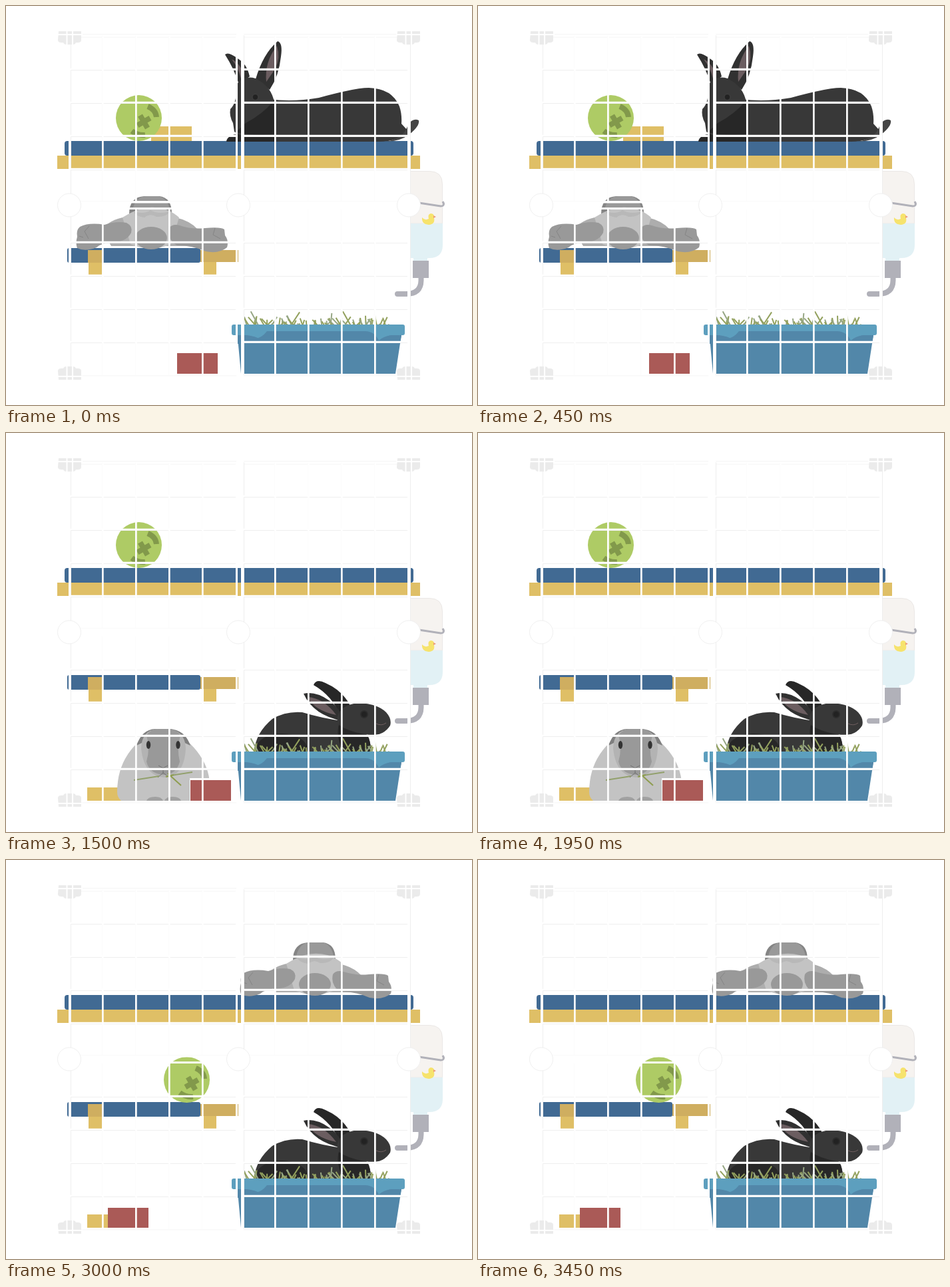
An HTML page that plays this animation: 700 px wide and 600 px high, repeating every 3750 ms.

```html
<!DOCTYPE html>
<html lang="en">
<head>
<meta charset="utf-8">
<title>Rabbit pen</title>
<style>
html, body { margin: 0; width: 100%; height: 100%; overflow: hidden; background: #fff; }
svg { display: block; width: 700px; height: 600px; }
.coat { fill: #383838; }
.dark { fill: #272727; }
.ear { fill: #313131; }
.pink { fill: #6b5d60; }
.wood { fill: #dfbf66; }
.shade { fill: #cfae60; }
.blue { fill: #416a93; }
.pale { fill: #c3c3c3; }
.mid { fill: #adadad; }
.grey { fill: #999; }
.line { fill: none; stroke: #858585; }
.mark { fill: none; stroke: #82994b; stroke-width: 8; }
</style>
</head>
<body>
<svg viewBox="0 0 700 600">
  <defs>
    <g id="joint">
      <path fill="#ebebeb" d="M79-9H113V4Q113 8 108 8H105Q104 11 100 11H91Q87 11 86 8H83Q78 8 78 4Z"/>
      <path stroke="#fff" stroke-width="2" d="M77-4H115M91.5-10V12M100-10V12"/>
    </g>
  </defs>

  <g id="bottle">
    <path fill="#f6f3f0" stroke="#ebe8e6" d="M607 248.500H636Q655.500 248.500 655.500 268V327H607Z"/>
    <path fill="#e2f1f5" d="M607 327H656V359Q656 379 636 379H633V383H612V379H607Z"/>
    <path fill="#b1b1b9" d="M611 383H635V409H611Z"/>
    <path fill="none" stroke="#b1b1b9" stroke-width="8" stroke-linecap="round" d="M623.500 408V413Q623 433 601 433H588"/>
    <path fill="none" stroke="#b1b1b9" stroke-width="3" d="M607 294L653 301Q658 301 657.500 297L656 294"/>
    <path fill="#f6e36d" d="M625 318Q629 323 635 320Q633 313 638 312Q644 312 643 319Q645 328 635 329Q624 328 625 318Z"/>
    <path fill="#ed9c78" d="M642 315L646 317L642 319Z"/>
  </g>

  <rect class="blue" x="88" y="203" width="524" height="22" rx="4"/>
  <path class="wood" d="M77 225H622V245H77ZM124 385H144V404H124ZM297 385H316V404H297Z"/>
  <rect class="blue" x="92" y="364" width="200" height="22" rx="3"/>
  <path class="shade" d="M123 367H144V386H123ZM292 367H349V385H292Z"/>

  <rect id="plank" class="wood" width="61" height="22"/>

  <g id="ball">
    <circle cx="199.500" cy="168.500" r="34.500" fill="#aecb65"/>
    <path class="mark" d="M197.500 179.500L216.500 168.500M201.500 164.500L212.500 183.500M213 151Q225 156 226 167M189 188Q198 195 209 194"/>
  </g>

  <g id="sprawled">
    <path fill="#858585" d="M185 313Q185 287 208 286H230Q249 288 249 312Z"/>
    <path class="grey" d="M190 306Q195 286 211 286H229Q242 288 246 306Z"/>
    <path class="mid" d="M144 336Q156 321 180 317H250Q276 322 288 336L278 361H158Z"/>
    <path class="pale" d="M175 318Q190 309 199 306Q217 300 237 305Q250 309 260 318L248 358Q217 371 187 358Z"/>
    <path fill="#b8b8b8" d="M191 309Q208 314 217 307Q228 314 246 309Q240 318 226 317Q217 311 208 318Q196 317 191 309Z"/>
    <path class="grey" d="M111 332Q125 325 148 329Q165 323 181 326Q191 331 188 341Q181 354 164 355Q146 355 136 363Q119 370 107 364Q104 357 107 347Q105 337 111 332Z"/>
    <path class="grey" d="M245 334Q250 327 261 330Q278 336 299 334Q323 332 328 336L329 345Q335 353 332 363Q320 373 300 369Q280 360 257 360Q241 351 245 334Z"/>
    <ellipse class="grey" cx="218" cy="349" rx="24" ry="17"/>
    <path class="line" d="M125 331L118 339L124 350M314 334L311 344L322 350M110 346L116 348"/>
  </g>

  <g id="loaf">
    <path class="coat" d="M395 140Q430 145 470 138Q525 123 545 123Q580 124 591 151Q595 163 594 177L604 188Q590 204 560 204H340L360 160Z"/>
    <path fill="#454545" d="M570 204Q598 200 604 178Q612 168 620 172Q622 180 606 193Q592 204 570 204Z"/>
    <path class="dark" d="M331 204Q332 194 350 192L400 190L405 204Z"/>
    <path class="ear" d="M329 73Q334 68 348 79Q362 87 366 106L350 118Q343 95 329 73ZM408 53Q416 55 413 76Q410 105 396 126L375 110Q386 72 408 53Z"/>
    <path class="pink" d="M339 80Q352 86 358 105L353 109Q349 93 339 80ZM407 60Q413 78 404 95L391 114Q388 84 407 60Z"/>
    <path class="coat" d="M347 117Q358 104 375 109Q399 121 403 145Q404 170 402 194Q360 202 343 189L341 176Q335 165 337 155Q347 146 347 117Z"/>
    <path class="dark" d="M402 143Q385 163 360 176L345 190Q375 196 402 193Z"/>
    <circle cx="374.500" cy="137" r="4.500" fill="#222" stroke="#444"/>
  </g>

  <g id="sitting">
    <path class="dark" d="M450 326Q460 301 487 281Q498 276 504 287Q500 299 485 307L462 346Z"/>
    <path class="coat" d="M415 365L466 338Q463 377 476 390Q520 420 545 454Q555 470 554 489H462Q450 462 437 440L425 410Z"/>
    <path class="dark" d="M410 372Q405 400 420 407Q405 436 405 460L400 474L407 473Q413 468 418 457L424 467Q433 465 433 441L449 403L445 368Z"/>
    <path class="ear" d="M462 348Q465 325 490 308Q510 295 523 298Q521 316 500 327Q480 333 462 348Z"/>
    <path class="pink" d="M476 333Q485 312 508 303Q522 299 507 313Q500 324 476 333Z"/>
    <path class="coat" d="M386 349Q386 336 396 333Q420 323 440 324Q458 322 466 336Q469 350 455 364Q440 377 425 376Q400 373 390 361Q386 355 386 349Z"/>
    <ellipse cx="433" cy="338" rx="6.500" ry="5" fill="#222" stroke="#2c2c2c" stroke-width="2"/>
    <path fill="none" stroke="#262626" d="M387 350Q393 349 398 346"/>
  </g>

  <g id="drinking">
    <path class="dark" d="M462 379Q466 369 480 376Q507 388 518 412L502 425Q490 395 462 379Z"/>
    <path class="coat" d="M373 478Q375 451 400 430Q420 418 445 420Q475 429 505 433L545 458Q550 475 546 489H374Z"/>
    <ellipse class="dark" cx="414" cy="476" rx="39" ry="24"/>
    <path class="dark" d="M501 434L541 452Q551 466 547 489H515Q492 462 501 434Z"/>
    <path class="ear" d="M447 392Q465 388 485 402Q504 415 506 433Q462 425 447 392Z"/>
    <path class="pink" d="M453 397Q478 399 496 424Q464 418 453 397Z"/>
    <path class="coat" d="M497 429Q502 408 530 406Q558 407 571 420Q580 430 577 440Q567 456 545 454Q515 450 500 439Z"/>
    <circle cx="538" cy="423" r="5" fill="#222" stroke="#2c2c2c" stroke-width="2"/>
    <path fill="none" stroke="#705f60" d="M556 437Q564 441 571 436"/>
  </g>

  <g id="facing">
    <path class="pale" d="M167 540Q167 491 203 461H270Q303 490 306 525V553H173Q167 548 167 540Z"/>
    <path fill="#7f7f7f" d="M196 470Q204 446 224 445H247Q269 447 277 470L262 463H210Z"/>
    <path fill="#b3b3b3" d="M203 474Q204 446 229 445H244Q269 448 270 474Q268 517 237 518Q207 515 203 474Z"/>
    <path class="grey" d="M211 455Q217 445 229 445H245Q257 446 262 455Q256 473 261 494Q256 514 236 514Q215 512 211 494Q217 473 211 455Z"/>
    <g fill="#333"><ellipse cx="214" cy="469" rx="3.200" ry="6"/><ellipse cx="258.500" cy="469" rx="3.200" ry="6"/></g>
    <path fill="none" stroke="#707070" d="M229 500L236 504L243 500M236 504V511L228 518M236 511L244 517"/>
    <path fill="none" stroke="#92a06c" stroke-width="2" d="M192 522L230 516M242 516L280 510"/>
    <path fill="none" stroke="#8e9d4f" stroke-width="2" d="M243 512L263 530M240 517L252 514"/>
    <path class="grey" d="M211 553Q213 547 224 547Q234 547 236 553ZM238 553Q240 547 250 547Q261 547 263 553Z" opacity=".8"/>
    <path fill="#fff" d="M276 519H338V553H276Z"/>
  </g>

  <rect id="brick" fill="#aa5a57" width="61" height="31"/>

  <g id="hay" fill="none" stroke-width="2"></g>
  <path fill="#5287a9" d="M347 488H595L585 553H353Z"/>
  <path fill="#5d9fbe" d="M342 479H596Q599 479 599 482V492Q599 495 596 495H580Q568 496 560 503Q553 489 540 489H392Q382 502 370 500Q360 495 354 495H342Q339 495 339 492V482Q339 479 342 479Z"/>
  <path fill="#5287a9" d="M347 495H362Q374 496 386 503H562Q572 495 580 495H594L592 508H348Z"/>

  <g id="grid" fill="none"></g>
  <use href="#joint" y="47"/>
  <use href="#joint" x="509" y="47"/>
  <use href="#joint" transform="translate(0 553) scale(1 -1)"/>
  <use href="#joint" transform="translate(509 553) scale(1 -1)"/>
  <g fill="#fff" stroke="#f0f0f0">
    <circle cx="95" cy="299.500" r="17.500"/><circle cx="349" cy="299.500" r="17.500"/><circle cx="605" cy="299.500" r="17.500"/>
  </g>
</svg>
<script>
const el = id => document.getElementById(id);
const path = (d, stroke, width) => `<path d="${d}" stroke="${stroke}" stroke-width="${width}"/>`;

// Wire panels: pale edges first, then the white wires over everything
const columns = [145.5, 195.5, 245.5, 295.5, 404.5, 454.5, 504.5, 554.5];
const rows = [95, 145, 195, 245, 355, 405, 455, 505];
const across = y => `M97 ${y}H346M357 ${y}H604`;
const down = x => `M${x} 44V293M${x} 306V555`;
const lines = (list, draw, shift = 0) => list.map(v => draw(v + shift)).join('');
el('grid').innerHTML =
  path(lines(rows, across, 1.5), '#e9e9e9', 1) +
  path(lines(columns, down, -1), '#f5f5f5', 1) +
  path(lines([42.5, 47, 293.5, 303.5, 556], across), '#f5f5f5', 1) +
  path(lines([97.5, 347.5, 357.5, 607.5], down), '#eee', 1) +
  path(lines(rows, across) + lines(columns, down), '#fff', 2.4) +
  path(lines([295, 304.5], across), '#fff', 3) +
  path('M95.5 44V555M346.5 44V555', '#fff', 3) +
  path('M355 44V555M605 44V555', '#fff', 4);

let seed = 17;
const random = () => (seed = seed * 16807 % 2147483647) / 2147483647;
let blades = '';
for (let i = 0; i < 96; i++) {
  const x = 364 + i * 2.15 + random() * 5;
  const lean = (random() - 0.5) * 38;
  const tip = Math.min(579, Math.max(358, x + lean));
  const height = 8 + random() * 16 + (i % 16 === 9 ? 7 : 0);
  blades += path(`M${x} 489L${tip} ${489 - height}`, i % 3 ? '#93a15e' : '#96a684', 2);
}
el('hay').innerHTML = blades;

// Position of each part in the five poses; null hides it
const low = [0, 0], dropped = [72, 162];
const poses = {
  plank: [[218, 181], [198, 533], [122, 533], [122, 533], [122, 533]],
  brick: [[257, 522], [257, 522], [277, 522], [277, 522], [153, 523]],
  ball: [low, low, low, dropped, dropped],
  sprawled: [low, low, null, null, [246, -162]],
  loaf: [low, null, null, low, null],
  sitting: [null, low, null, null, null],
  drinking: [null, null, low, null, low],
  facing: [null, null, low, low, null]
};

function show(now) {
  const step = Math.floor(now % 3750 / 750);
  for (const name in poses) {
    const place = poses[name][step];
    const part = el(name);
    part.style.display = place ? '' : 'none';
    if (place) part.setAttribute('transform', `translate(${place})`);
  }
  // Blocks standing on the floor end at its edge
  el('plank').setAttribute('height', step ? 20 : 22);
  el('brick').setAttribute('height', step === 4 ? 30 : 31);
  requestAnimationFrame(tick);
}
const start = performance.now();
const tick = () => show(performance.now() - start);
tick();
</script>
</body>
</html>
```
